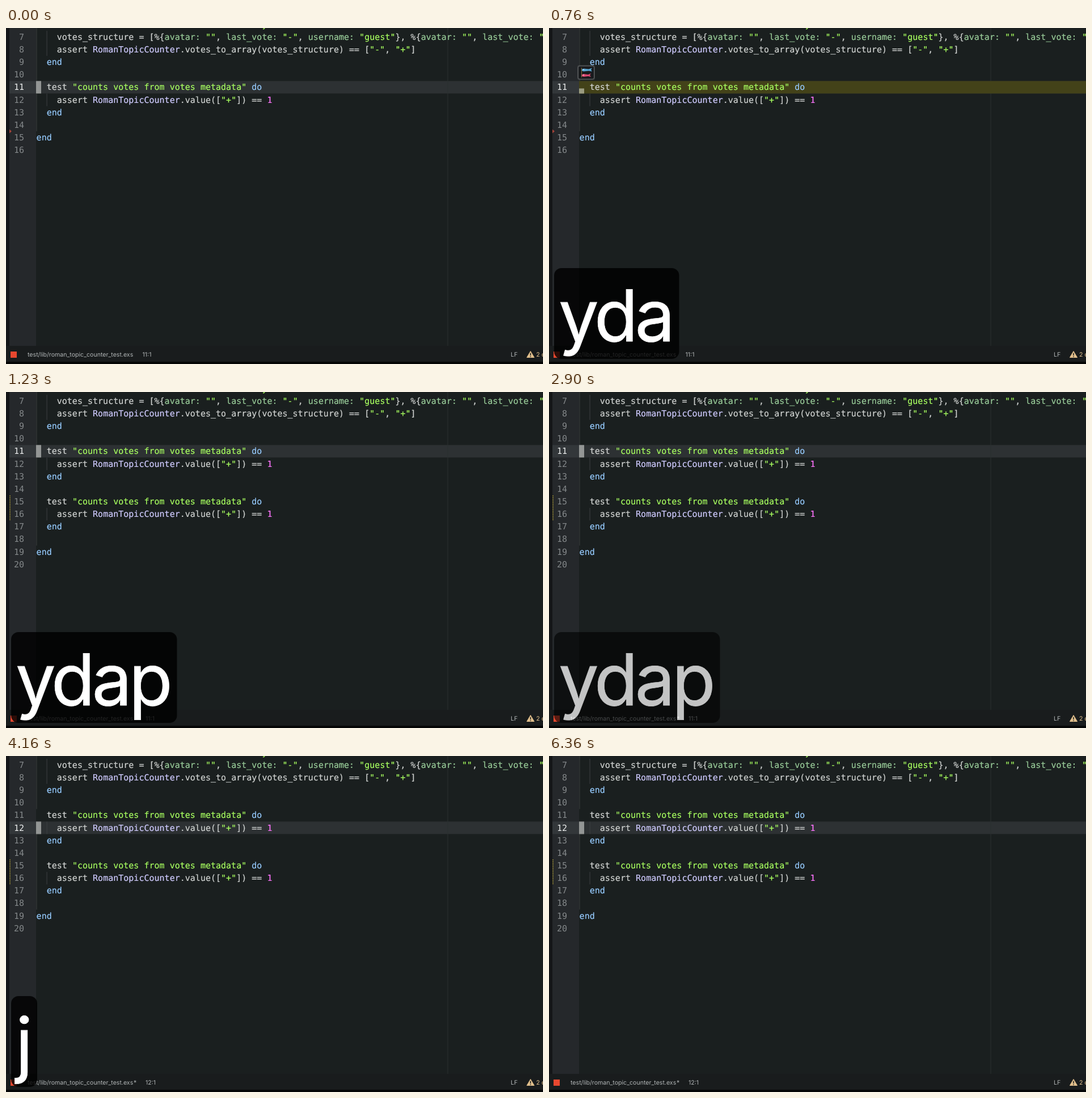
An HTML page for the animation above (8000 ms loop, 947x592 px).

```html
<!DOCTYPE html>
<html lang="en">
<head>
<meta charset="utf-8">
<title>Duplicate a paragraph</title>
<style>
html, body { margin: 0; width: 100%; height: 100%; overflow: hidden; background: #000; }
svg { display: block; width: 947px; height: 592px; }
text { white-space: pre; text-rendering: geometricPrecision; }
.code, .num { font: 15.03px "DejaVu Sans Mono", "Liberation Mono", monospace; }
.code { fill: #d0d3d1; stroke: #d0d3d1; stroke-width: .2; }
.num { fill: #84888a; text-anchor: end; }
.on { fill: #eceeee; }
.str { fill: #a8ff60; stroke: #a8ff60; }
.key { fill: #99cc99; stroke: #99cc99; }
.kw { fill: #96cbfe; stroke: #96cbfe; }
.type { fill: #cfcbff; stroke: #cfcbff; }
.int { fill: #ff73fd; stroke: #ff73fd; }
.guide { fill: #3c4041; }
.status { font: 10.6px Inter, "Open Sans", sans-serif; fill: #b1b5b6; }
.big { font: 126px Inter, "Open Sans", sans-serif; letter-spacing: -5.5px; fill: #fff; stroke: #fff; stroke-width: .8; }

.anim { animation: 8s step-end infinite; }
.hid { opacity: 0; }
.old { animation-name: old; }
.new { animation-name: new; }
.clean { animation-name: clean; }
.dirty { animation-name: dirty; }
.first { animation-name: first; }
.second { animation-name: second; }
.row { animation-name: row; }
.pending { animation-name: pending; }
.block { animation-name: block; }
.selected { animation-name: selected; }
.k-y { animation-name: k-y; }
.k-yd { animation-name: k-yd; }
.k-yda { animation-name: k-yda; }
.k-ydap { animation-name: k-ydap; }
.k-j { animation-name: k-j; }

@keyframes old { 11.25%, to { opacity: 0 } }
@keyframes new { 11.25%, to { opacity: 1 } }
@keyframes clean { 15.375%, to { opacity: 0 } }
@keyframes dirty { 15.375%, to { opacity: 1 } }
@keyframes first { 52%, to { opacity: 0 } }
@keyframes second { 52%, to { opacity: 1 } }
@keyframes row { 52%, to { transform: translateY(22.15px) } }
@keyframes pending { 8.75% { opacity: 1 } 11.25% { opacity: 0 } }
@keyframes block { 8.75% { opacity: 0 } 11.25% { opacity: 1 } }
@keyframes selected { 11.25% { opacity: 1 } 12.875% { opacity: 0 } }
@keyframes k-y { 6.25% { opacity: 1 } 8.75% { opacity: 0 } }
@keyframes k-yd { 8.75% { opacity: 1 } 9.5% { opacity: 0 } }
@keyframes k-yda { 9.5% { opacity: 1 } 11.25% { opacity: 0 } }
@keyframes k-ydap {
  11.25% { opacity: 1 } 36.25% { opacity: .74 } 37% { opacity: .48 }
  37.875% { opacity: .22 } 38.75% { opacity: 0 }
}
@keyframes k-j {
  52% { opacity: 1 } 77% { opacity: .74 } 77.75% { opacity: .48 }
  78.625% { opacity: .22 } 79.5% { opacity: 0 }
}
</style>
</head>
<body>
<svg viewBox="0 0 947 592">
  <rect width="947" height="588" fill="#1a1f1f"/>
  <rect width="6" height="588" fill="#141618"/>
  <rect x="6" width="47" height="560" fill="#25282b"/>
  <g id="numbers"></g>

  <path class="anim clean" d="M6 178.5l4 3.5-4 3.5z" fill="#a5433a"/>
  <path class="anim dirty hid" d="M7 182v44" stroke="#8d8133" stroke-width="1.6" stroke-dasharray="2 1"/>

  <g class="anim row">
    <rect x="6" y="93.4" width="47" height="22" fill="#33373a"/>
    <rect x="53" y="93.4" width="894" height="22" fill="#2d3133"/>
  </g>
  <rect x="778.5" width="1" height="560" fill="#2b3031"/>
  <rect class="anim pending hid" x="53" y="93.4" width="894" height="22" fill="#434219"/>
  <text class="num on anim first" x="32" y="109.4">11</text>
  <text class="num on anim second hid" x="32" y="131.55">12</text>

  <g id="code"></g>
  <g class="anim row"><rect class="anim block" x="53" y="93.4" width="9" height="22" fill="#939695"/></g>
  <rect class="anim selected hid" x="53" y="93.4" width="894" height="177" fill="#fff" fill-opacity=".42"/>

  <g class="anim pending hid">
    <rect x="53" y="106.5" width="9" height="9" fill="#9a9b80"/>
    <rect x="50" y="65.5" width="31" height="26" rx="4" fill="#777" fill-opacity=".4"/>
    <rect x="51.5" y="67" width="28" height="23" rx="3" fill="#191b1e" stroke="#5d6062"/>
    <path d="M57.5 70v17" stroke="#85743f"/>
    <path d="M58 72.5l3-1 9 1 6-2-2 3 2 3-6-1-9 1-3-1z" fill="#56a5d2"/>
    <path d="M58 82l3-1 8 1 5-2-2 3 2 3-5-1-8 1-3-1z" fill="#d94870"/>
    <path d="M60 73.5h2M60 83h2" stroke="#fff"/>
  </g>

  <rect y="560" width="947" height="28" fill="#191c1d"/>
  <rect y="588" width="947" height="4" fill="#050606"/>
  <rect x="8" y="570" width="11" height="11" fill="#e8482f"/>
  <g class="status">
    <text x="38" y="579">test/lib/roman_topic_counter_test.exs</text>
    <text class="anim dirty hid" x="225" y="579">*</text>
    <text class="anim clean" x="240.5" y="579">11:1</text>
    <g class="anim dirty hid">
      <text class="anim first" x="246" y="579">11:1</text>
      <text class="anim second hid" x="246" y="579">12:1</text>
    </g>
    <text x="890" y="579">LF</text>
    <text x="935" y="579" fill="#e2c08d">2 deprecations</text>
  </g>
  <path d="M925 569.5l6.5 11h-13z" fill="#e2c08d" stroke="#e2c08d" stroke-linejoin="round"/>
  <path d="M925 572.5v4.5M925 578.3v1.5" stroke="#191c1d" stroke-width="1.5"/>
  <g id="keys"></g>
</svg>

<script>
const LINE = 22.15, CHAR = 9.05, LEFT = 53.6;
const baseline = n => 109.4 + (n - 11) * LINE;
const get = id => document.getElementById(id);

const kinds = ['str', 'key', 'kw', 'type', 'int'];
const token = /("[^"]*")|(\w+:)|\b(do|end)\b|\b([A-Z]\w+)|\b(\d+)\b/g;
const paint = src => src.replace(token, (all, ...groups) =>
  `<tspan class="${kinds[groups.slice(0, 5).findIndex(Boolean)]}">${all}</tspan>`);

const line = (n, src) =>
  `<text class="code" x="${LEFT}" y="${baseline(n)}">${paint(src)}</text>`;
const guide = (col, from, to) =>
  `<rect class="guide" x="${53.5 + col * CHAR}" y="${93.4 + (from - 11) * LINE}" width="1" height="${(to - from + 1) * LINE}"/>`;
const group = (cls, ...parts) => `<g class="anim ${cls}">${parts.join('')}</g>`;

const block = n => [
  guide(2, n + 1, n + 1),
  line(n, '  test "counts votes from votes metadata" do'),
  line(n + 1, '    assert RomanTopicCounter.value(["+"]) == 1'),
  line(n + 2, '  end')
].join('');

get('code').innerHTML = [
  guide(0, 6, 10), guide(0, 12, 14), guide(2, 7, 8),
  `<text class="code str" x="${LEFT + 44 * CHAR}" y="${baseline(6)}">y</text>`,
  line(7, '    votes_structure = [%{avatar: "", last_vote: "-", username: "guest"}, %{avatar: "", last_vote: "+"'),
  line(8, '    assert RomanTopicCounter.votes_to_array(votes_structure) == ["-", "+"]'),
  line(9, '  end'),
  block(11),
  group('old', line(15, 'end')),
  group('new hid', guide(0, 15, 18), block(15), line(19, 'end'))
].join('');

const number = n => `<text class="num" x="32" y="${baseline(n)}">${n}</text>`;
const range = (a, b) => Array.from({ length: b - a + 1 }, (_, i) => number(a + i)).join('');
get('numbers').innerHTML = range(7, 16) + group('new hid', range(17, 20));

const key = ([word, width]) => group(`k-${word} hid`,
  `<rect x="9" y="423" width="${width}" height="160" rx="13" fill-opacity=".81"/>`,
  `<text class="big" x="17" y="552">${word}</text>`);
const keys = { y: 82, yd: 154, yda: 220.5, ydap: 292.5, j: 46 };
get('keys').innerHTML = Object.entries(keys).map(key).join('');
</script>
</body>
</html>
```
